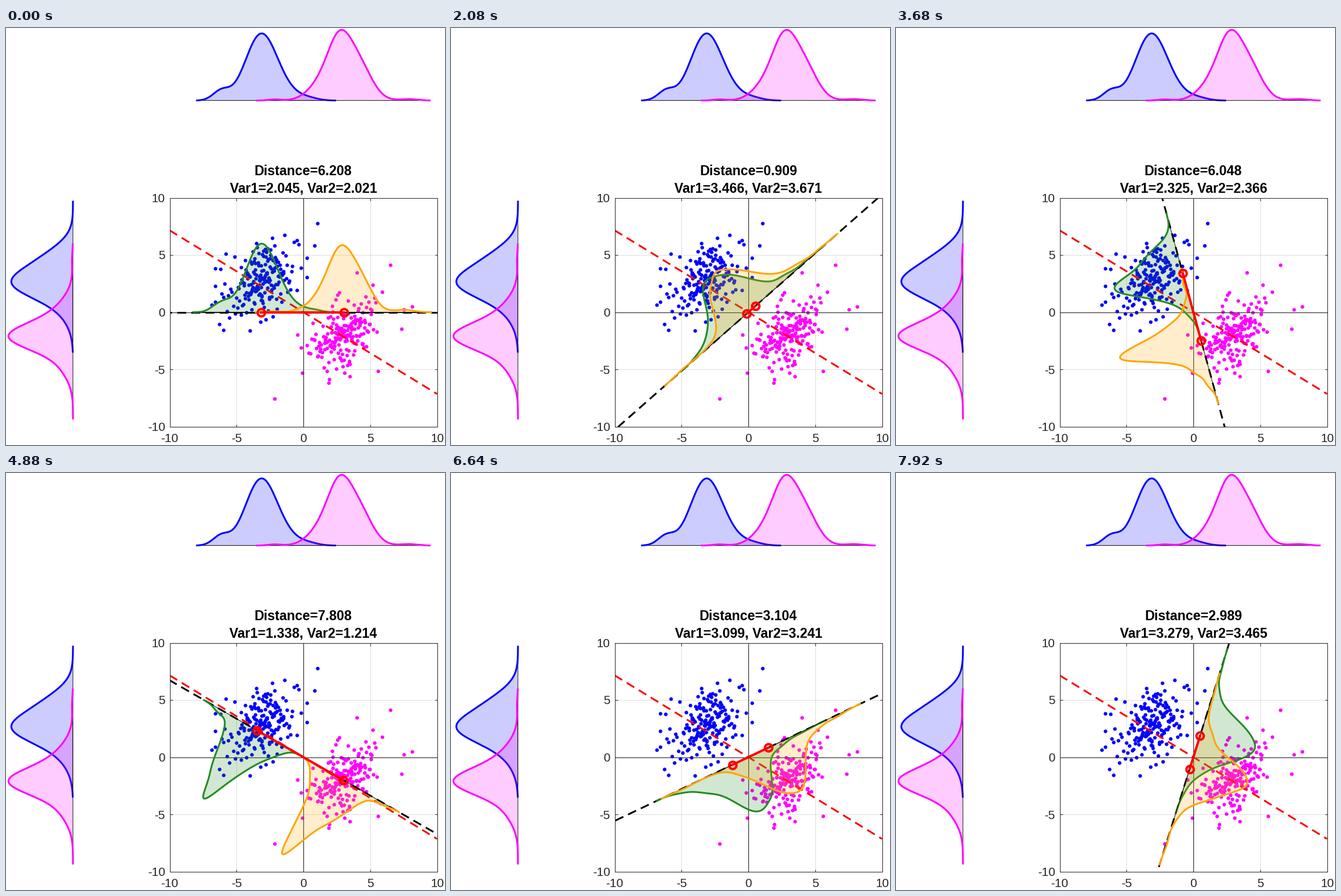
These frames come from a looping animation (747 px wide and 711 px high, 8000 ms). A matplotlib script:

```python
import numpy as np
import matplotlib.pyplot as plt
from matplotlib.animation import FuncAnimation

W, H, DPI = 747, 711, 100
PT = 72 / DPI
LEFT, RIGHT, TOP, BOTTOM = 278.5, 733.5, 289.5, 679.5
SX, SY = (RIGHT - LEFT) / 20, (BOTTOM - TOP) / 20
CX, CY = (LEFT + RIGHT) / 2, (TOP + BOTTOM) / 2
N = 200
HOLD, STEP = 10, 0.05
DARK = "#262626"
GREEN, ORANGE = "#228b22", "#ffa500"

plt.rcParams["font.family"] = "Liberation Sans"

# Marginals in pixels: range, kernel width, then bells as (centre, width, height)
BLUE_X = (325, 560, 10, [(432, 26, 98), (458, 30, 23), (366, 14, 16), (515, 16, 3)])
BLUE_Y = (296, 552, 12, [(437, 24, 80), (398, 27, 46), (475, 28, 19)])
PINK_X = (427, 721, 10, [(567, 19, 75), (598, 23, 64), (541, 24, 33),
                         (457, 11, 2), (685, 15, 2.5)])
PINK_Y = (369, 666, 12, [(527, 22, 90), (492, 29, 30), (570, 26, 20), (395, 15, 1.6)])

# A few far points of each cloud
BLUE_FAR = [(1.05, 7.75), (.84, 5.8), (-.5, 6.3), (-6.6, .9), (-6, -1.55),
            (-4, -1.6), (-6.6, 3.8), (-5.8, 5.1), (.25, 3.05)]
PINK_FAR = [(6.5, 4.15), (8.15, .5), (7.35, -1.45), (-2.15, -7.55), (5.6, -5.15),
            (1.9, -6.2), (-.1, -5.3), (-.45, -1.95), (5.9, 1.75)]


def profile(curve, sharpen=False):
    """Sum of bells; sharpened, the kernel width is taken out of each bell."""
    lo, hi, bw, bells = curve
    pos = np.linspace(lo, hi, 400)
    total = np.zeros_like(pos)
    for centre, width, height in bells:
        w = np.sqrt(width ** 2 - bw ** 2) if sharpen else width
        total += height * width / w * np.exp(-((pos - centre) / w) ** 2 / 2)
    return pos, total


def quantiles(pos, height, mean, var):
    order = np.argsort(pos)
    cdf = np.cumsum(height[order])
    q = np.interp((np.arange(N) + .5) / N, cdf / cdf[-1], pos[order])
    return mean + (q - q.mean()) * np.sqrt(var) / q.std(ddof=1)


def cloud(far, mean, cov, curve_x, curve_y, seed):
    """Random points shaped to the marginals, with exact mean and covariance."""
    rng = np.random.default_rng(seed)
    mean, cov = np.array(mean), np.array(cov)
    k = len(far)
    pts = np.vstack([far, rng.multivariate_normal(mean, cov * .7, N - k)])
    px, hx = profile(curve_x, sharpen=True)
    py, hy = profile(curve_y, sharpen=True)
    goals = [quantiles((px - CX) / SX, hx, mean[0], cov[0, 0]),
             quantiles((CY - py) / SY, hy, mean[1], cov[1, 1])]
    rest = cov * (N - 1) + N * np.outer(mean, mean) - pts[:k].T @ pts[:k]
    mid = (N * mean - pts[:k].sum(0)) / (N - k)
    want = np.linalg.cholesky(rest / (N - k) - np.outer(mid, mid))
    for _ in range(40):
        for axis, goal in enumerate(goals):
            rank = pts[:, axis].argsort().argsort()
            pts[k:, axis] += .5 * (goal[rank] - pts[:, axis])[k:]
        core = pts[k:]
        have = np.linalg.cholesky(np.cov(core.T, ddof=0))
        pts[k:] = mid + (core - core.mean(0)) @ np.linalg.inv(have).T @ want.T
    return pts


def density(t):
    """Gaussian kernel estimate with a robust bandwidth."""
    bw = np.median(np.abs(t - np.median(t))) / .6745 * (4 / (3 * N)) ** .2
    s = np.linspace(t.min() - 3 * bw, t.max() + 3 * bw, 100)
    z = (s[:, None] - t) / bw
    return s, np.exp(-z * z / 2).mean(1) / (bw * np.sqrt(2 * np.pi))


blue = cloud(BLUE_FAR, (-3.16, 2.84), [[2.045, 1.0238], [1.0238, 2.8182]],
             BLUE_X, BLUE_Y, 4)
pink = cloud(PINK_FAR, (3.0476, -1.9221), [[2.0213, 1.1795], [1.1795, 2.9356]],
             PINK_X, PINK_Y, 9)

fig = plt.figure(figsize=(W / DPI, H / DPI), dpi=DPI, facecolor="white")

# Side panels, in pixel coordinates
page = fig.add_axes([0, 0, 1, 1])
page.set(xlim=(0, W), ylim=(H, 0))
page.axis("off")


def panel(x, y, color, z):
    page.fill(x, y, color=color, alpha=.2, lw=0, zorder=z)
    page.plot(x[[0, -1]], y[[0, -1]], color="black", lw=.9 * PT, zorder=z)
    page.plot(x, y, color=color, lw=3 * PT, zorder=z + .1)


for z, (color, top, side) in enumerate([("blue", BLUE_X, BLUE_Y),
                                        ("magenta", PINK_X, PINK_Y)]):
    pos, h = profile(top)
    panel(pos, 123.7 - h, color, z)
    pos, h = profile(side)
    panel(114 - h, pos, color, z)

# Main plot
ax = fig.add_axes([LEFT / W, 1 - BOTTOM / H, (RIGHT - LEFT) / W, (BOTTOM - TOP) / H])
ticks = range(-10, 11, 5)
ax.set(xlim=(-10, 10), ylim=(-10, 10), xticks=ticks, yticks=ticks)
ax.set_xticklabels([str(v) for v in ticks])
ax.set_yticklabels([str(v) for v in ticks])
ax.set_axisbelow(True)
ax.grid(color=DARK, alpha=.15, lw=PT)
ax.tick_params(direction="in", top=True, right=True, length=4.5 * PT, width=PT,
               color=DARK, labelcolor=DARK, labelsize=20.8 * PT)
ax.tick_params(axis="x", pad=11 * PT)
ax.tick_params(axis="y", pad=8 * PT)
for spine in ax.spines.values():
    spine.set(color=DARK, linewidth=PT)

for pts, color in ((blue, "blue"), (pink, "magenta")):
    ax.plot(*pts.T, "o", color=color, ms=6.2 * PT, mew=0, zorder=2)
ax.axhline(0, color=DARK, lw=1.1 * PT, zorder=2.1)
ax.axvline(0, color=DARK, lw=1.1 * PT, zorder=2.1)
DASHED = dict(lw=3 * PT, ls=(0, (5, 3)), dash_capstyle="butt")
ax.plot([-10, 10], [7.15, -7.15], color="red", zorder=2.2, **DASHED)
axis_line, = ax.plot([], [], color="black", zorder=2.3, **DASHED)


def hump(color, z):
    fill, = ax.fill([0], [0], color=color, alpha=.2, lw=0, zorder=z)
    base, = ax.plot([], [], color="black", lw=.9 * PT, zorder=z)
    line, = ax.plot([], [], color=color, lw=3 * PT, zorder=z + .1)
    return fill, base, line


humps = [hump(GREEN, 2.4), hump(ORANGE, 2.6)]
link, = ax.plot([], [], "o-", color="red", lw=4 * PT, ms=12.5 * PT, mfc="none",
                mec="red", mew=4 * PT, zorder=3)


def title(y):
    return fig.text(CX / W, 1 - y / H, "", ha="center", va="baseline",
                    fontsize=22.9 * PT, fontweight="bold", color="black")


head, sub = title(251), title(281)


def draw(frame):
    angle = STEP * max(0, frame - HOLD)
    u = np.array([np.cos(angle), np.sin(angle)])
    normal = np.array([-u[1], u[0]])
    axis_line.set_data(*np.outer([-20, 20], u).T)
    means, spreads = [], []
    for pts, (fill, base, line) in zip((blue, pink), humps):
        t = pts @ u
        means.append(t.mean())
        spreads.append(t.var(ddof=1))
        s, d = density(t)
        path = np.outer(s, u) + 20 * np.outer(d, normal)
        fill.set_xy(path)
        line.set_data(*path.T)
        base.set_data(*path[[0, -1]].T)
    link.set_data(*np.outer(means, u).T)
    head.set_text(f"Distance={abs(means[1] - means[0]):.3f}")
    sub.set_text(f"Var1={spreads[0]:.3f}, Var2={spreads[1]:.3f}")
    return []


anim = FuncAnimation(fig, draw, frames=100, interval=80, repeat=True, repeat_delay=0)
plt.show()
```
